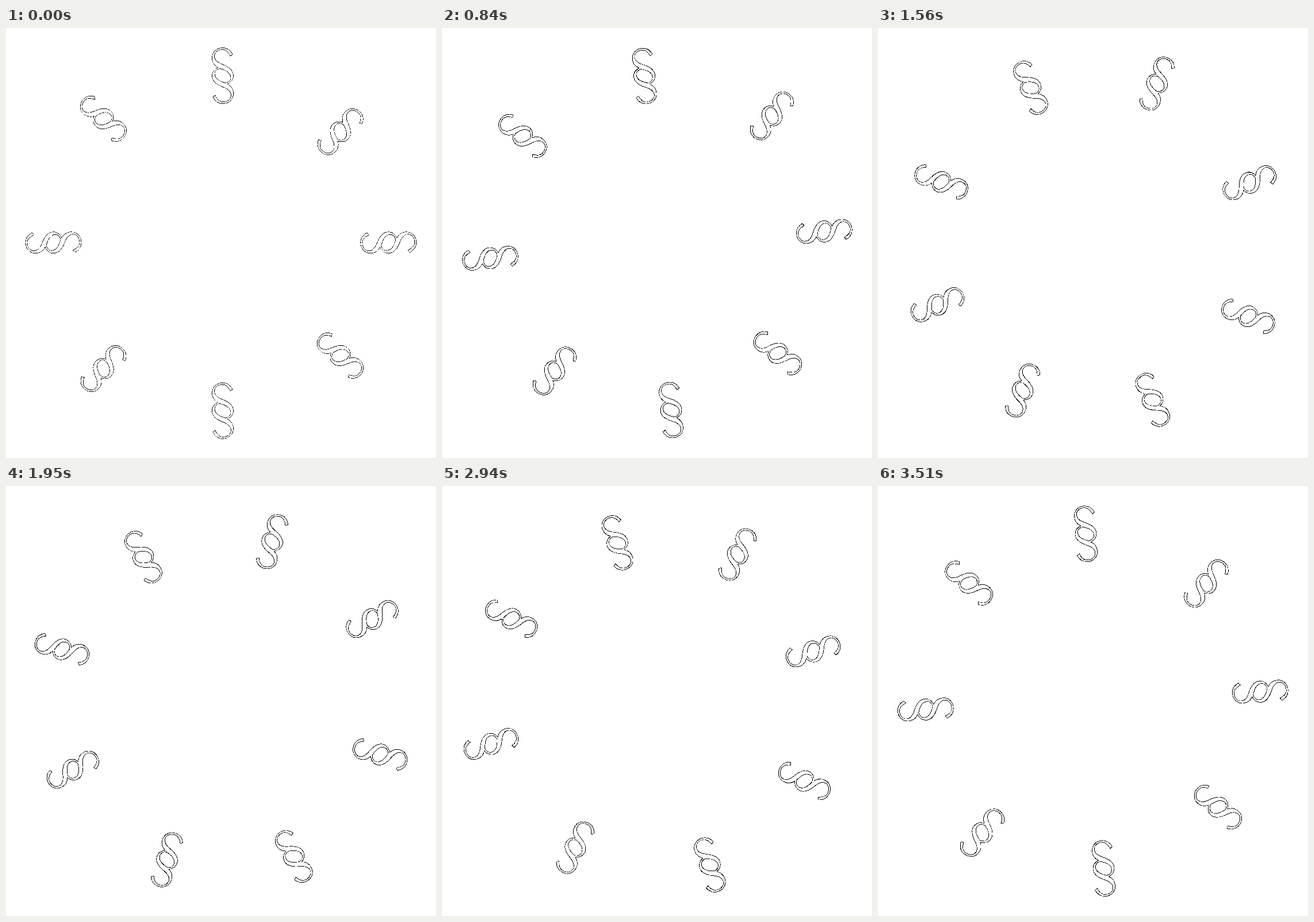
Write an HTML page with a canvas that moves like this. It is 748 px wide and 748 px high and loops after 3.54 s.

```html
<!DOCTYPE html>
<html>
<head>
<meta charset="utf-8">
<style>
  html, body { margin: 0; width: 100%; height: 100%; overflow: hidden; background: #fff; }
  canvas { display: block; width: 748px; height: 748px; }
</style>
</head>
<body>
<canvas id="stage" width="748" height="748"></canvas>
<script>
const SIZE = 748, LOOP = 3540, STEP = 30, RADIUS = 291.4, CUTOFF = 145;
const ctx = document.getElementById('stage').getContext('2d', { willReadFrequently: true });

// Half of the sign; the other half is the same outline turned by 180 degrees
const half = new Path2D(`M8 14.5 C14 12 18.5 7 18.5 0 C18.5 -10 10 -15.5 0 -19.5
  C-8 -22.5 -14.5 -27 -14.5 -34 C-14.5 -41 -8 -45.5 0 -45.5 C6 -45.5 10 -41 13 -34
  L17 -37 C13.5 -44 8 -48.5 0 -48.5 C-10 -48.5 -18.5 -42 -18.5 -31
  C-18.5 -24 -15 -18 -8 -14.5
  M-5 -12.5 C3 -10.5 14 -6 14 3 C14 8 11 11 5 12.5`);
const sign = new Path2D(half);
sign.addPath(half, new DOMMatrix().rotate(180));

// Opposite signs form rigid pairs: angle and offset from the hub
const pairs = [[0, 2.8, 0], [45, 1.4, 12.1], [90, -.3, -1.15], [135, 1.15, -10.6]];
const ring = new Path2D();
for (const [angle, x, y] of pairs)
  for (const r of [-RADIUS, RADIUS])
    ring.addPath(sign, new DOMMatrix().translate(x, y).rotate(angle).translate(0, r));

// Turn soft edges into plain black pixels, which leaves the hairlines dotted
function harden() {
  const image = ctx.getImageData(0, 0, SIZE, SIZE), { data } = image;
  for (let i = 3; i < data.length; i += 4) data[i] = data[i] > CUTOFF ? 255 : 0;
  ctx.putImageData(image, 0, 0);
}

let shown = -1;
function draw(now) {
  const step = Math.floor((now - start) % LOOP / STEP);
  if (step !== shown) {
    shown = step;
    ctx.clearRect(0, 0, SIZE, SIZE);
    ctx.save();
    ctx.translate(374.2, 374.4);
    ctx.rotate(step * STEP / LOOP * 2 * Math.PI);
    ctx.stroke(ring);
    ctx.restore();
    harden();
  }
  requestAnimationFrame(() => draw(performance.now()));
}
const start = performance.now();
draw(start);
</script>
</body>
</html>
```
